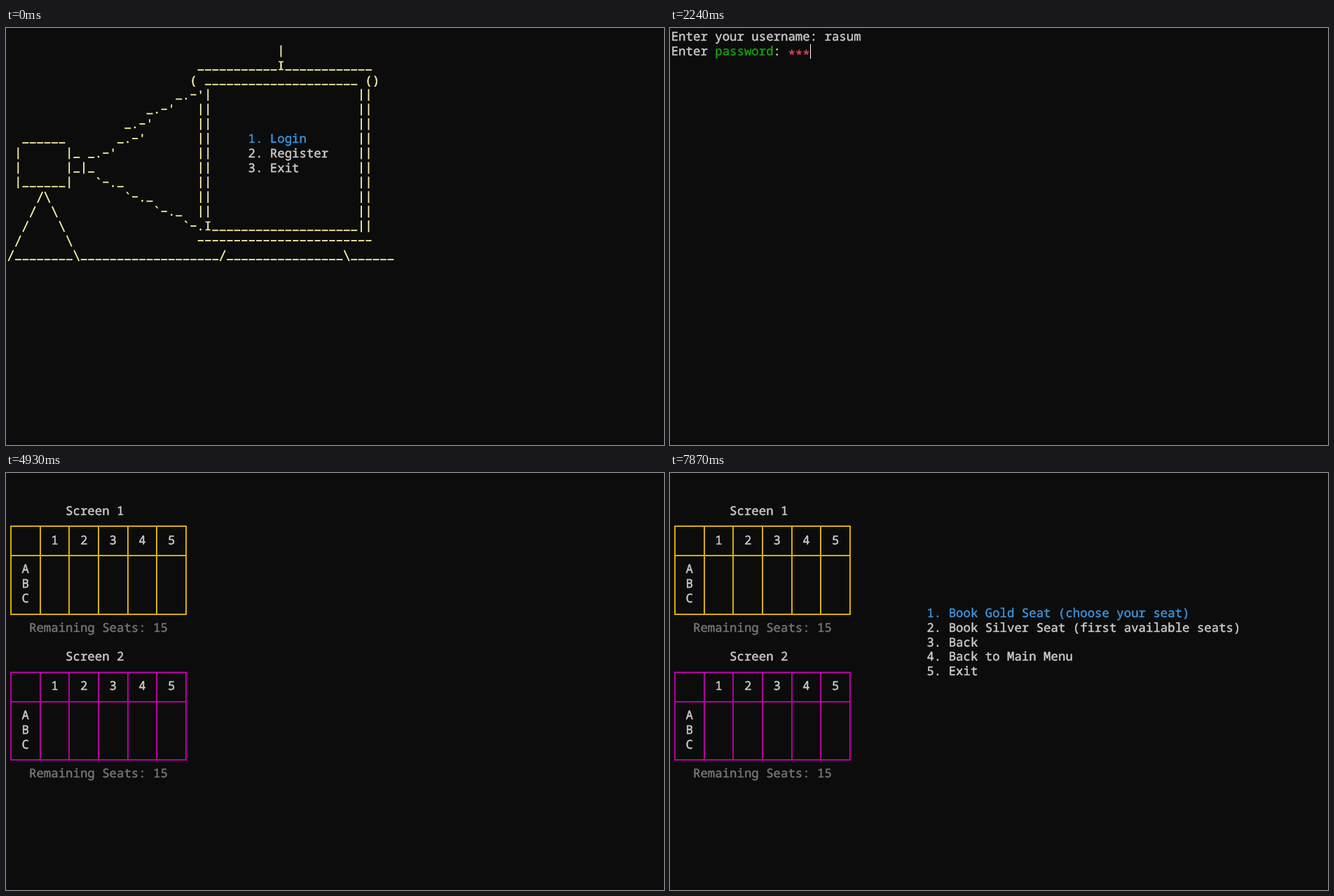
An HTML page with a canvas for the animation above (8 s loop, 939 px wide and 596 px high).

```html
<!DOCTYPE html>
<html lang="en">
<head>
<meta charset="utf-8">
<title>Cinema booking terminal</title>
<style>
  html, body { margin: 0; width: 100%; height: 100%; overflow: hidden; background: #0c0c0c; }
  canvas { display: block; }
</style>
</head>
<body>
<canvas id="stage" width="939" height="596"></canvas>
<pre id="art" hidden>

                                     |
                          ___________I____________
                         ( _____________________ ()
                       _.-'|                    ||
                   _.-'   ||                    ||
                _.-'      ||                    ||
  ______       _.-'       ||                    ||
 |      |_ _.-'           ||                    ||
 |      |_|_              ||                    ||
 |______|   `-._          ||                    ||
    /\          `-._      ||                    ||
   /  \             `-._  ||                    ||
  /    \                `-.I____________________||
 /      \                 ------------------------
/________\___________________/________________\______
</pre>
<script>
const LOOP = 8000;
const CELL_W = 10.42, CELL_H = 20.85, LEFT = 1.7, TOP = 2, BASELINE = 18.2;
const TEXT_WEIGHT = 0.45;
const color = {
  background: '#0c0c0c', text: '#cccccc', dim: '#767676', selected: '#3a96dd',
  art: '#f9f1a5', gold: '#d7af00', magenta: '#b4009e',
  green: '#13a10e', brightGreen: '#16c60c', red: '#e74856', cursor: '#ffffff'
};

const USER = 'rasum';
const userKeys = [770, 840, 1050, 1120, 1250];
const passwordKeys = [1910, 1980, 2240, 2310, 2440];

const loginMenu = ['Login', 'Register', 'Exit'];
const mainMenu = ['See Available Movies', 'Logout', 'Exit'];
const movieMenu = [
  'Screen 1: The Hollow Ferry [Drama/Fantasy]',
  'Screen 2: Rust Lantern [Crime/Drama]',
  'Search Movie by Title', 'Back', 'Exit'
];
const bookingMenu = [
  'Book Gold Seat (choose your seat)',
  'Book Silver Seat (first available seats)',
  'Back', 'Back to Main Menu', 'Exit'
];

const ctx = document.getElementById('stage').getContext('2d');
const artRows = document.getElementById('art').textContent.split('\n');

const cellX = col => LEFT + col * CELL_W;
const baseY = row => BASELINE + row * CELL_H;
const pressed = (keys, t) => keys.filter(k => k <= t).length;

// Line glyphs as [x1, y1, x2, y2] from the cell's left edge and baseline.
const strokes = {
  '_': [0.8, 0, 9.8, 0],
  '-': [1.1, -6.2, 9.3, -6.2],
  '|': [5.2, -14.3, 5.2, 2.5],
  '/': [1.6, 2.2, 8.8, -13.4],
  '\\': [1.6, -13.4, 8.8, 2.2]
};

// A thin outline gives the letters a medium weight.
function write(text, col, row, paint = color.text, dy = 0) {
  ctx.fillStyle = ctx.strokeStyle = paint;
  ctx.lineWidth = TEXT_WEIGHT;
  [...text].forEach((ch, i) => {
    const x = cellX(col + i), y = Math.round(baseY(row) + dy);
    ctx.fillText(ch, x, y);
    ctx.strokeText(ch, x, y);
  });
}

function line(x1, y1, x2, y2, paint, width) {
  ctx.strokeStyle = paint;
  ctx.lineWidth = width;
  ctx.beginPath();
  ctx.moveTo(x1, y1);
  ctx.lineTo(x2, y2);
  ctx.stroke();
}

function drawArt() {
  artRows.forEach((text, row) => [...text].forEach((ch, col) => {
    const s = strokes[ch], x = cellX(col), y = baseY(row);
    if (s) line(x + s[0], y + s[1], x + s[2], y + s[3], color.art, 1.8);
    else if (ch !== ' ') write(ch, col, row, color.art);
  }));
}

function drawMenu(items, col, row, selected = 0) {
  items.forEach((item, i) =>
    write(`${i + 1}. ${item}`, col, row + i, i === selected ? color.selected : color.text));
}

function drawCursor(col, row) {
  ctx.fillStyle = color.cursor;
  ctx.fillRect(Math.round(cellX(col)), Math.round(TOP + row * CELL_H), 1, 21);
}

function drawScreen(number, row, border) {
  const gridX = col => Math.round(cellX(col + 0.5));
  const gridY = r => Math.round(13.9 + r * CELL_H);
  const top = row + 1, bottom = row + 7;

  write(`Screen ${number}`, 8, row);
  for (const r of [top, top + 2, bottom]) {
    line(gridX(0) - 1, gridY(r), gridX(24) + 1, gridY(r), border, 2);
  }
  for (let col = 0; col <= 24; col += 4) {
    line(gridX(col), gridY(top), gridX(col), gridY(bottom), border, 2);
  }
  for (let seat = 1; seat <= 5; seat++) write(String(seat), 2 + seat * 4, row + 2);
  [...'ABC'].forEach((letter, i) => write(letter, 2, row + 4 + i));
  write('Remaining Seats: 15', 3, row + 8, color.dim);
}

function drawScreens(row) {
  drawScreen(1, row, color.gold);
  drawScreen(2, row + 10, color.magenta);
}

function drawLogin(t) {
  const typed = pressed(userKeys, t);
  write('Enter your username: ' + USER.slice(0, typed), 0, 0);
  if (t < 1450) return drawCursor(21 + typed, 0);

  const stars = pressed(passwordKeys, t);
  write('Enter', 0, 1);
  write('password', 6, 1, color.green);
  write(':', 14, 1);
  write('*'.repeat(stars), 16, 1, color.red, 4.5);
  if (t < 3050 || t >= 3580) drawCursor(16 + stars, 1);
}

function draw(t) {
  ctx.fillStyle = color.background;
  ctx.fillRect(0, 0, 939, 596);
  if (t < 500) {
    drawArt();
    drawMenu(loginMenu, 33, 7);
  } else if (t < 3650) {
    drawLogin(t);
  } else if (t < 4930) {
    write(`Login successful!, Welcome ${USER}`, 0, 0, color.brightGreen);
    drawScreens(3);
    if (t >= 3720) drawMenu(mainMenu, 35, 9);
  } else {
    drawScreens(2);
    if (t >= 7870) drawMenu(bookingMenu, 35, 9);
    else if (t >= 4990) drawMenu(movieMenu, 35, 9, t >= 7060 && t < 7610 ? 1 : 0);
  }
}

ctx.font = '17.37px "Noto Sans Mono", "DejaVu Sans Mono", monospace';
ctx.textRendering = 'geometricPrecision';
ctx.lineJoin = 'round';
const start = performance.now();
function tick() {
  draw((performance.now() - start) % LOOP);
  requestAnimationFrame(tick);
}
tick();
</script>
</body>
</html>
```
